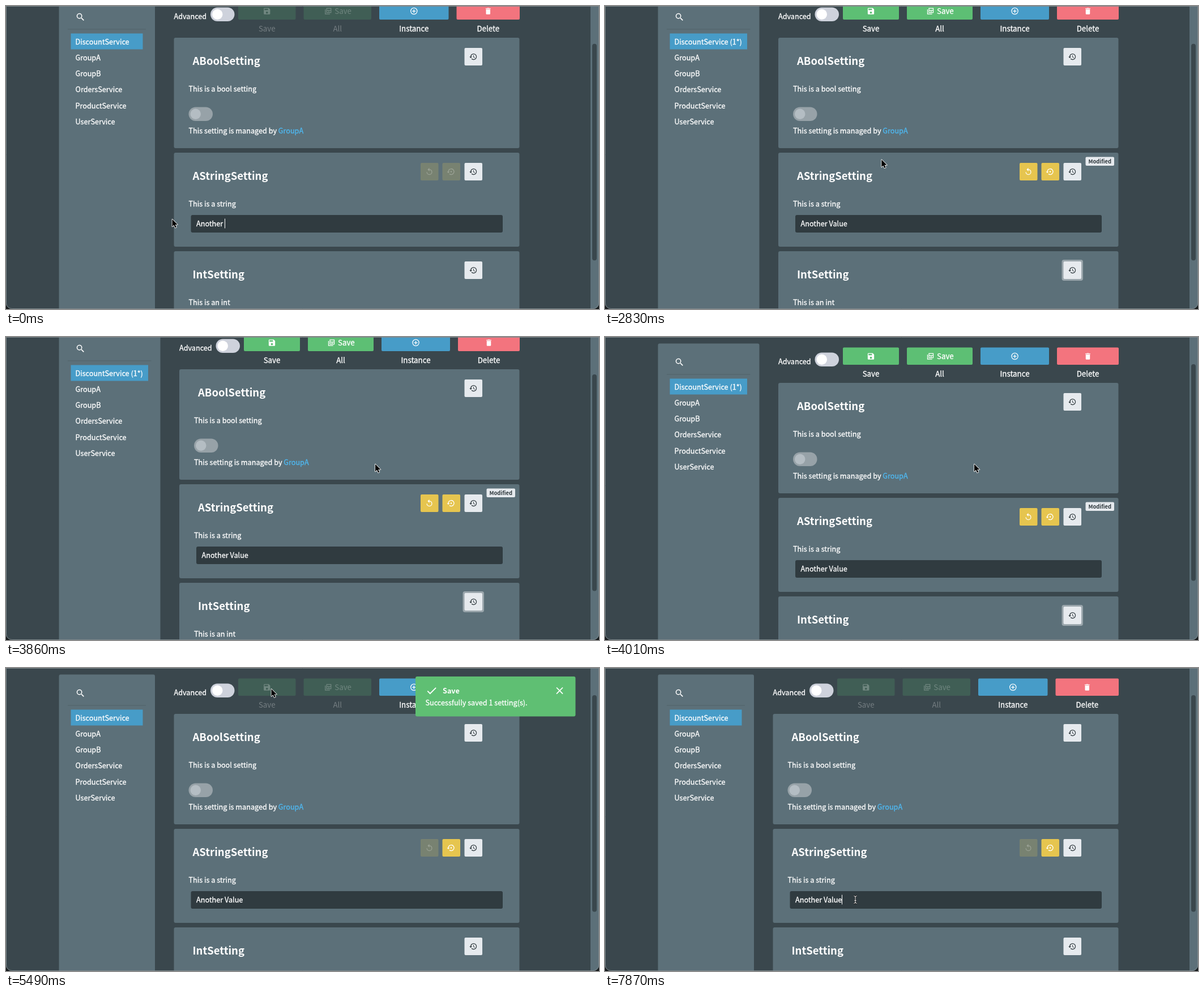
An HTML page with a canvas that plays this animation: 1047 by 535 pixels, repeating every 8 s.

```html
<!DOCTYPE html>
<html lang="en">
<head>
<meta charset="utf-8">
<title>Settings page</title>
<style>
html, body { margin: 0; width: 100%; height: 100%; overflow: hidden; background: #111; }
canvas { display: block; }
</style>
</head>
<body>
<canvas id="stage" width="1047" height="535"></canvas>
<script>
const ctx = document.getElementById('stage').getContext('2d');
const LOOP = 8000, STEP = 146.5;
const FONT = '"Noto Sans CJK JP", "Noto Sans CJK SC", "Noto Sans", sans-serif';
const PAGE = '#3a474d', PANEL = '#5c7079', FIELD = '#303b40', LIGHT = '#e6eaee', INK = '#2c363b';
const GREEN = '#5dbf74', BLUE = '#479cc8', RED = '#f3747e', YELLOW = '#e6c54f';

// Icons on a 24-unit grid
const ICONS = {
  history: 'M13 3a9 9 0 0 0-9 9H1l3.9 3.9.1.1L9 12H6a7 7 0 1 1 7 7c-1.9 0-3.7-.8-4.9-2.1l-1.5 1.5A9 9 0 1 0 13 3zm-1 5v5l4.3 2.5.7-1.2-3.5-2V8z',
  restore: 'M14 12a2 2 0 1 0-4 0 2 2 0 0 0 4 0zM12 3a9 9 0 0 0-9 9H0l4 4 4-4H5a7 7 0 1 1 7 7c-1.5 0-2.9-.5-4-1.3l-1.5 1.4A9 9 0 1 0 12 3z',
  replay: 'M12 5V1L7 6l5 5V7a6 6 0 1 1-6 6H4a8 8 0 1 0 8-8z',
  save: 'M17 3H5a2 2 0 0 0-2 2v14a2 2 0 0 0 2 2h14a2 2 0 0 0 2-2V7zM12 19a3 3 0 1 1 0-6 3 3 0 0 1 0 6zM15 9H5V5h10z',
  saveAll: 'M7 3h14v14H7zM9 5v4h10V5zM9 11v4h4v-4zM15 11v4h4v-4zM3 7h2v12h12v2H3z',
  add: 'M13 7h-2v4H7v2h4v4h2v-4h4v-2h-4zM12 2a10 10 0 1 0 0 20 10 10 0 0 0 0-20zM12 20a8 8 0 1 1 0-16 8 8 0 0 1 0 16z',
  trash: 'M6 19a2 2 0 0 0 2 2h8a2 2 0 0 0 2-2V7H6zM19 4h-3.5l-1-1h-5l-1 1H5v2h14z',
  search: 'M15.5 14h-.8l-.3-.3A6.5 6.5 0 1 0 13.7 14.4l.3.3v.8l5 5 1.5-1.5zM9.5 14a4.5 4.5 0 1 1 0-9 4.500 4.500 0 0 1 0 9z',
  check: 'M9 16.2L4.800 12l-1.400 1.400L9 19 21 7l-1.400-1.400z',
  close: 'M19 6.400L17.600 5 12 10.600 6.400 5 5 6.400 10.600 12 5 17.600 6.400 19 12 13.400 17.600 19 19 17.600 13.400 12z'
};
for (const name in ICONS) ICONS[name] = new Path2D(ICONS[name]);

const ARROW = new Path2D('M0 0v13l3-2.700 2.100 4.600 2.200-1-2.100-4.400h4.200z');
const HAND = new Path2D('M-1 .8q1-1.400 2 0v4.200l5 1.200q1 .5.8 2l-.8 4H.5l-4-4.500q0-1.600 2.500.3z');
const BEAM = new Path2D('M-2.500-6.500Q0-6.500 0-4.500Q0-6.500 2.500-6.500M0-4.500V4.500M-2.500 6.500Q0 6.500 0 4.500Q0 6.500 2.500 6.500M-1.500 1.500h3');

// Pointer moves: start time, steps, end point
const START = [293.5, 376.5];
const MOVES = [
  [1050, 4, 458, 280], [2830, 4, 652, 224.500], [4310, 6, 468.500, 37],
  [5940, 6, 981, 41], [7120, 4, 442, 409]
];

function box(x, y, w, h, fill, r = 2, alpha = 1) {
  const before = ctx.globalAlpha;
  ctx.globalAlpha = before * alpha;
  ctx.fillStyle = fill;
  ctx.beginPath();
  ctx.roundRect(x, y, w, h, r);
  ctx.fill();
  ctx.globalAlpha = before;
}

function text(str, x, y, { size = 12.65, bold = false, fill = '#fff', align = 'left', alpha = 1 } = {}) {
  const before = ctx.globalAlpha;
  ctx.font = `${bold ? 700 : 400} ${size}px ${FONT}`;
  ctx.textAlign = align;
  ctx.globalAlpha = before * alpha;
  ctx.fillStyle = ctx.strokeStyle = fill;
  ctx.fillText(str, x, y);
  if (!bold && alpha === 1) {
    ctx.lineWidth = 0.3;
    ctx.strokeText(str, x, y);
  }
  ctx.globalAlpha = before;
  return ctx.measureText(str).width;
}

function icon(name, x, y, size, fill = '#fff', alpha = 1) {
  ctx.save();
  ctx.translate(x - size / 2, y - size / 2);
  ctx.scale(size / 24, size / 24);
  ctx.globalAlpha *= alpha;
  ctx.fillStyle = fill;
  ctx.fill(ICONS[name], 'evenodd');
  ctx.restore();
}

function toggle(x, y, track, knob) {
  box(x, y, 42.5, 24.5, track, 12.25);
  box(x + 3, y + 3, 18.5, 18.5, knob, 9.25);
}

function toolButton(x, right, label, color, glyph, on = true) {
  const mid = (x + right) / 2, alpha = on ? 1 : 0.25;
  box(x, 18.5, right - x, 30.5, color, 2, on ? 1 : 0.19);
  if (label === 'All') {
    icon(glyph, mid - 16.5, 34, 15, '#fff', alpha);
    text('Save', mid - 5, 38.5, { size: 13.3, alpha });
  } else {
    icon(glyph, mid, 34, 15, '#fff', alpha);
  }
  text(label, mid, 69.5, { size: 13.3, align: 'center', alpha: on ? 1 : 0.3 });
}

function cardButton(x, y, color, glyph, fill, on = true) {
  box(x, y, 31.5, 31, color, 2, on ? 1 : 0.2);
  icon(glyph, x + 15.5, y + 15.500, 15, fill, on ? 1 : 0.25);
}

function card(left, top, height, title, note) {
  box(left, top, 906.500 - left, height, PANEL, 3);
  text(title, left + 33, top + 47.500, { size: 18.5, bold: true });
  text(note, left + 26, top + 94.500);
  cardButton(809.5, top + 18, LIGHT, 'history', INK);
}

function sidebar(dirty) {
  const right = dirty ? 272.5 : 263;
  box(93.5, 11.5, right - 93.5, 700, PANEL, 3);
  icon('search', 131.500, 44.500, 18);
  box(109, 65.500, right - 125, 1, '#50636b', 0);
  box(114.5, 73.5, right - 136, 28, BLUE, 0);
  ['DiscountService' + (dirty ? ' (1*)' : ''), 'GroupA', 'GroupB', 'OrdersService', 'ProductService', 'UserService']
    .forEach((name, i) => text(name, 122.5, 92.5 + i * 28.25));
}

function toolbar(left, dirty, hover) {
  text('Advanced', left, 47.5);
  toggle(dirty ? 370.5 : 361, 27.5, '#ced2dc', '#fff');
  const edges = dirty
    ? [420, 519, 533, 649, 663, 784, 798]
    : [410, 511.500, 525.500, 645, 659, 781.500, 795.500];
  toolButton(edges[0], edges[1], 'Save', hover ? '#50a865' : GREEN, 'save', dirty);
  toolButton(edges[2], edges[3], 'All', GREEN, 'saveAll', dirty);
  toolButton(edges[4], edges[5], 'Instance', BLUE, 'add');
  toolButton(edges[6], 907, 'Delete', RED, 'trash');
}

function stringField(left, value, caret) {
  box(left + 30, 394, 847 - left, 31, FIELD, 3);
  const width = text(value, left + 39.5, 413.5);
  if (caret) box(Math.round(left + 39.5 + width), 400.5, 1, 17, '#fff', 0);
}

function toast(t) {
  const leaving = t >= 6825;
  ctx.save();
  if (leaving) {
    ctx.globalAlpha = 0.5;
    ctx.translate(15, 0);
  }
  box(723, 15, 282.5, 70.5, '#5fbf73', 3);
  icon('check', 751.500, 40, 22);
  text('Save', 771, 45, { bold: true });
  text('Successfully saved 1 setting(s).', 740.5, 66);
  icon('close', 977.500, 40, 21);
  ctx.restore();
}

function pointerAt(t) {
  let [x, y] = START;
  for (const [start, steps, tx, ty] of MOVES) {
    const k = Math.min(steps, Math.floor((t - start) / STEP) + 1);
    if (k <= 0) break;
    const p = k / steps, e = p * p * (3 - 2 * p);
    x += (tx - x) * e;
    y += (ty - y) * e;
  }
  return [x, y];
}

function pointer(t, hover) {
  const closeHover = t >= 6670 && t < 7120;
  ctx.save();
  ctx.translate(...pointerAt(t));
  ctx.lineJoin = 'round';
  if (t >= 7555) {
    ctx.strokeStyle = '#111';
    ctx.lineWidth = 2.4;
    ctx.stroke(BEAM);
    ctx.strokeStyle = '#fff';
    ctx.lineWidth = 1;
    ctx.stroke(BEAM);
  } else if (hover || closeHover) {
    ctx.fillStyle = '#fff';
    ctx.strokeStyle = '#111';
    ctx.lineWidth = 1.2;
    ctx.fill(HAND);
    ctx.stroke(HAND);
  } else {
    ctx.strokeStyle = '#fff';
    ctx.lineWidth = 1.6;
    ctx.stroke(ARROW);
    ctx.fillStyle = '#000';
    ctx.fill(ARROW);
  }
  ctx.restore();
}

function draw(t) {
  const dirty = t >= 2390 && t < 5490, saved = t >= 5490;
  const hover = t >= 5040 && t < 5490;
  const left = dirty ? 306 : 296.5;
  const scroll = t < 3720 ? 0 : t < 3865 ? 1 : t < 4010 ? 14 : 25;
  const typed = 8 + [150, 150, 300, 300, 450].filter(at => t >= at).length;

  ctx.fillStyle = '#15191b';
  ctx.fillRect(0, 0, 1047, 535);
  ctx.save();
  ctx.beginPath();
  ctx.roundRect(0, 0, 1047, 535, [0, 0, 10, 10]);
  ctx.clip();
  box(0, 0, 1047, 535, PAGE, 0);

  ctx.save();
  ctx.translate(0, scroll - 25);
  sidebar(dirty);
  toolbar(left, dirty, hover);

  card(left, 81, 195, 'ABoolSetting', 'This is a bool setting');
  toggle(left + 26, 203.5, '#97a2a8', '#b4bdc3');
  const width = text('This setting is managed by ', left + 26, 249.5);
  text('GroupA', left + 26 + width, 249.5, { fill: '#4fb8f0' });

  card(left, 284, 166, 'AStringSetting', 'This is a string');
  cardButton(732, 302, YELLOW, 'replay', '#fff', dirty);
  cardButton(770.5, 302, YELLOW, 'restore', '#fff', dirty || saved);
  stringField(left, 'Another Value'.slice(0, typed), t < 1940 || t >= 7870);
  if (dirty) {
    box(848.5, 291.5, 50.5, 15.5, LIGHT, 2);
    text('Modified', 873.7, 303, { size: 9.4, bold: true, fill: INK, align: 'center' });
  }

  if (dirty && t < 5185) box(806.5, 473, 37.5, 37, '#9aa6ac', 4);
  card(left, 458, 200, 'IntSetting', 'This is an int');
  if (dirty && t < 5185) {
    box(806.5, 473, 37.5, 37, '#9aa6ac', 4);
    cardButton(809.5, 476, LIGHT, 'history', INK);
  }
  ctx.restore();

  box(1032, 0, 15, 535, PANEL, 0);
  box(1035, 66.7 - scroll * 0.75, 8, 382.5, PAGE, 4);
  if (saved && t < 6970) toast(t);
  pointer(t, hover);
  ctx.restore();

  ctx.strokeStyle = '#7e888c';
  ctx.lineWidth = 1;
  ctx.beginPath();
  ctx.roundRect(0.5, 0.5, 1046, 534, [0, 0, 10, 10]);
  ctx.stroke();
}

function tick(now) {
  draw(now % LOOP);
  requestAnimationFrame(tick);
}
requestAnimationFrame(tick);
</script>
</body>
</html>
```
